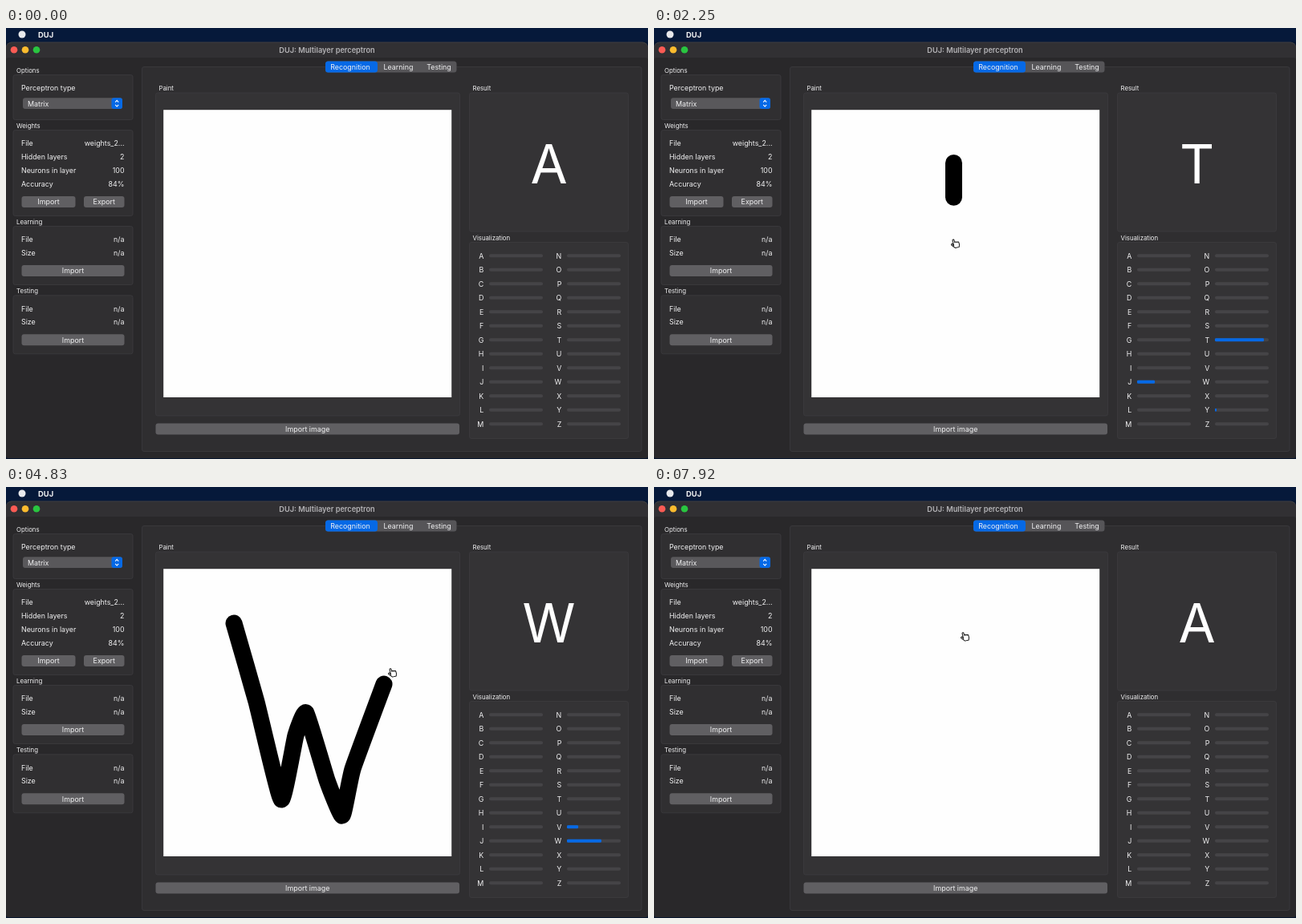
Recreate the animation shown at these times as an HTML page. Size 800 px wide and 538 px high, loop 8000 ms.

```html
<!DOCTYPE html>
<html lang="en">
<head>
<meta charset="utf-8">
<title>Multilayer perceptron</title>
<style>
html, body { margin: 0; width: 100%; height: 100%; overflow: hidden; background: #06152e; }
svg { display: block; width: 100vw; height: 100vh; }
text { font-family: Inter, Roboto, sans-serif; fill: #f1f1f2; white-space: pre; }
</style>
</head>
<body>
<svg id="stage" viewBox="0 0 800 538"></svg>
<script>
const LOOP = 8000, STEP = 1000 / 12, BLUE = '#0669e6';
const INK_LAG = 50; // the paint trails the pointer a little
const stage = document.getElementById('stage');

function add(tag, attrs, content) {
  const el = document.createElementNS('http://www.w3.org/2000/svg', tag);
  for (const key in attrs) el.setAttribute(key, attrs[key]);
  if (content !== undefined) el.textContent = content;
  stage.appendChild(el);
  return el;
}
const rect = (x, y, width, height, fill, rx = 0, more = {}) =>
  add('rect', { x, y, width, height, fill, rx, ...more });
const circle = (cx, cy, r, fill) => add('circle', { cx, cy, r, fill });
// y is the middle of the capitals
const label = (s, x, y, size = 8.9, anchor = 'start', more = {}) =>
  add('text', { x, y: y + size * 0.364, 'font-size': size, 'text-anchor': anchor, ...more }, s);
const frame = (x, y, w, h, fill) =>
  rect(x + 0.5, y + 0.5, w - 1, h - 1, fill, 2.5, { stroke: '#3d3c3f', 'stroke-width': 0.8 });
function group(title, x, y, w, h, fill = '#302f31') {
  frame(x, y, w, h, fill);
  label(title, x + 4.5, y - 5.2, 7.8);
}
function button(s, x, y, w) {
  rect(x, y, w, 14, '#605f62', 3);
  label(s, x + w / 2, y + 7, 8.9, 'middle');
}
function row(name, value, y) {
  label(name, 19, y);
  label(value, 147.5, y, 8.9, 'end');
}

// Menu bar and window
rect(0, 0, 800, 538, '#06152e');
rect(0, 0, 800, 17, '#06193a');
circle(20, 8, 4.5, '#e8e9ec');
label('DUJ', 40, 8.2, 9.4, 'start', { 'font-weight': 700 });
rect(0, 17.5, 800, 519.5, '#4a494c', 7);
rect(0, 18.3, 800, 518.7, '#313033', 7);
rect(0, 37, 800, 500, '#29282a', 3);
['#fb5b54', '#fbbb2e', '#29c540'].forEach((c, i) => circle(10 + 14 * i, 27.3, 4.3, c));
label('DUJ: Multilayer perceptron', 400, 27.2, 9.2, 'middle', { 'font-weight': 600, style: 'fill:#b5b4b7' });

// Sidebar
group('Options', 8.5, 58, 150, 57);
label('Perceptron type', 19, 74.5);
rect(21, 87.3, 124, 13.8, '#59585b', 3);
rect(131.5, 87.3, 13.5, 13.8, BLUE, 3);
add('path', { d: 'M136.2 92.6l2-2.2 2 2.2M136.2 95.8l2 2.2 2-2.2', fill: 'none', stroke: '#fff', 'stroke-width': 1.1 });
label('Matrix', 27, 94.4);
group('Weights', 8.5, 127, 150, 108);
['File|weights_2...', 'Hidden layers|2', 'Neurons in layer|100', 'Accuracy|84%']
  .forEach((s, i) => row(...s.split('|'), 144 + 16.8 * i));
button('Import', 19.5, 210, 67);
button('Export', 97, 210, 50.5);
[['Learning', 247], ['Testing', 333.3]].forEach(([title, y]) => {
  group(title, 8.5, y, 150, 74);
  row('File', 'n/a', y + 17);
  row('Size', 'n/a', y + 33.8);
  button('Import', 19.5, y + 49, 128);
});

// Tabs and work area
frame(169, 48, 623.5, 481, '#2f2e30');
rect(398, 41.5, 163.5, 14, '#565558', 3.5);
rect(398, 41.5, 65, 14, BLUE, 3.5);
label('Recognition', 429, 48.8, 8.9, 'middle');
label('Learning', 489, 48.8, 8.9, 'middle');
label('Testing', 539.5, 48.8, 8.9, 'middle');
group('Paint', 186, 80.5, 380, 404, '#343335');
rect(196.2, 102.2, 359, 358.8, '#fefefe');
button('Import image', 186.5, 493.5, 378.5);
group('Result', 577, 80.5, 199, 174, '#343335');
group('Visualization', 577, 267, 199, 246, '#343335');
const answer = label('A', 676.5, 169.3, 67, 'middle', { style: 'fill:#fff' });

const bars = {};
[...'ABCDEFGHIJKLMNOPQRSTUVWXYZ'].forEach((c, i) => {
  const right = i > 12, x = right ? 699 : 602, y = 284.3 + 17.5 * (i % 13);
  label(c, right ? 692.3 : 595.3, y, 8.9, 'end');
  rect(x, y - 2, 67, 4, '#454447', 2);
  bars[c] = rect(x, y - 2, 0, 4, BLUE, 1.2);
});

// Smooth path through key points; bend 0 gives straight pieces
function curve(points, bend) {
  const p = points.split(' ').map(s => s.split(',').map(Number));
  const at = i => p[Math.max(0, Math.min(p.length - 1, i))];
  const handle = (i, side) => at(i).map((v, k) => v + side * bend * (at(i + 1)[k] - at(i - 1)[k]) / 6);
  return 'M' + p[0] + p.slice(1).map((q, i) => `C${handle(i, 1)} ${handle(i + 1, -1)} ${q}`).join('');
}

// One pen stroke; power above 1 speeds up on the way
function pen(from, to, points, bend = 1, power = 1) {
  const path = add('path', {
    d: curve(points, bend), fill: 'none', stroke: '#000', 'stroke-width': 21,
    'stroke-linecap': 'round', 'stroke-linejoin': 'round'
  });
  const length = path.getTotalLength();
  const reach = t => length * Math.max(0, Math.min(1, (t - from) / (to - from))) ** power;
  return {
    from, to,
    at: t => path.getPointAtLength(reach(t)),
    paint(t, cleared) {
      const shown = t - INK_LAG >= from && t < cleared;
      path.setAttribute('visibility', shown ? 'visible' : 'hidden');
      path.setAttribute('stroke-dasharray', `${reach(t - INK_LAG) + 0.01} ${length + 50}`);
    }
  };
}
const rest = (from, to, x, y) => ({ from, to, at: () => ({ x, y }) });

// Letters: strokes, time of clearing, then each guess with its time and levels
const letters = [
  {
    strokes: [pen(334, 1767, '414,158 384,157 353,157 318,195 350,245 410,290 400,350 330,376 274,365', 1, 2)],
    clear: 1900,
    guesses: [[820, 'T', { F: 0.13, T: 0.29, I: 0.02 }], [1300, 'S', { S: 0.95 }]]
  }, {
    strokes: [pen(2102, 2329, '373.5,168.5 373.5,400', 0, 2), pen(2560, 2780, '262,166 470,163', 0)],
    clear: 2930,
    guesses: [[2240, 'T', { T: 0.91, J: 0.33, Y: 0.03 }], [2700, 'T', { T: 0.99 }]]
  }, {
    strokes: [pen(3060, 3600, '310,162 307,225 317,315 334,388 372,416.5 408,395 452,325 470,255 471,216')],
    clear: 3900,
    guesses: [[3400, 'L', { L: 0.7, U: 0.2 }], [3560, 'U', { U: 0.93, V: 0.45 }]]
  }, {
    strokes: [pen(4100, 4740, '284,170 312,268 343,390 361,310 374,282 400,366 419,410 432,352 471,246', 0.4)],
    clear: 5000,
    guesses: [[4400, 'V', { V: 0.8, W: 0.1 }], [4690, 'W', { W: 0.64, V: 0.21 }]]
  }, {
    strokes: [pen(5150, 5800, '288,181 403,185 451,190 388,240 340,297 272,384 390,387 446,391.5', 0.4)],
    clear: 6250,
    guesses: [[5450, 'T', { T: 0.5, F: 0.1 }], [5700, 'Z', { Z: 0.64, I: 0.28 }]]
  }
];

const track = [
  rest(160, 200, 455, 225),
  rest(4825, 4920, 479.5, 229.5),
  rest(5950, 6250, 437, 342),
  rest(7600, LOOP, 385.5, 184.5),
  ...letters.flatMap(l => l.strokes)
].sort((a, b) => a.from - b.from);

const hand = add('path', {
  d: 'M-2 2.4V-4.2a1 1 0 0 1 2 0V-1.3a1 1 0 0 1 1.8.2a1 1 0 0 1 1.7.4a.9.9 0 0 1 1.5.7V2.6L4 5.6H-.8L-4.6 1a1 1 0 0 1 1.4-1.3z',
  fill: '#fff', stroke: '#111', 'stroke-width': 1, 'stroke-linejoin': 'round'
});

function pointer(t) {
  const i = track.findLastIndex(s => s.from <= t);
  if (i < 0) return null;
  const now = track[i], next = track[i + 1], a = now.at(t);
  if (t <= now.to || !next) return a;
  const u = (t - now.to) / (next.from - now.to), k = u * u * (3 - 2 * u), b = next.at(t);
  return { x: a.x + (b.x - a.x) * k, y: a.y + (b.y - a.y) * k };
}

function draw(t) {
  let guess = [0, 'A', {}];
  for (const l of letters) {
    l.strokes.forEach(s => s.paint(t, l.clear));
    if (t < l.clear) guess = l.guesses.findLast(g => g[0] <= t) || guess;
  }
  answer.textContent = guess[1];
  for (const c in bars) bars[c].setAttribute('width', 67 * (guess[2][c] || 0));

  const p = pointer(t);
  hand.setAttribute('visibility', p ? 'visible' : 'hidden');
  if (p) hand.setAttribute('transform', `translate(${p.x + 1.5} ${p.y + 2}) rotate(-14)`);
}

const start = performance.now();
function tick() {
  const t = (performance.now() - start) % LOOP;
  draw(Math.floor((t + 5) / STEP) * STEP % LOOP);
  requestAnimationFrame(tick);
}
tick();
</script>
</body>
</html>
```
